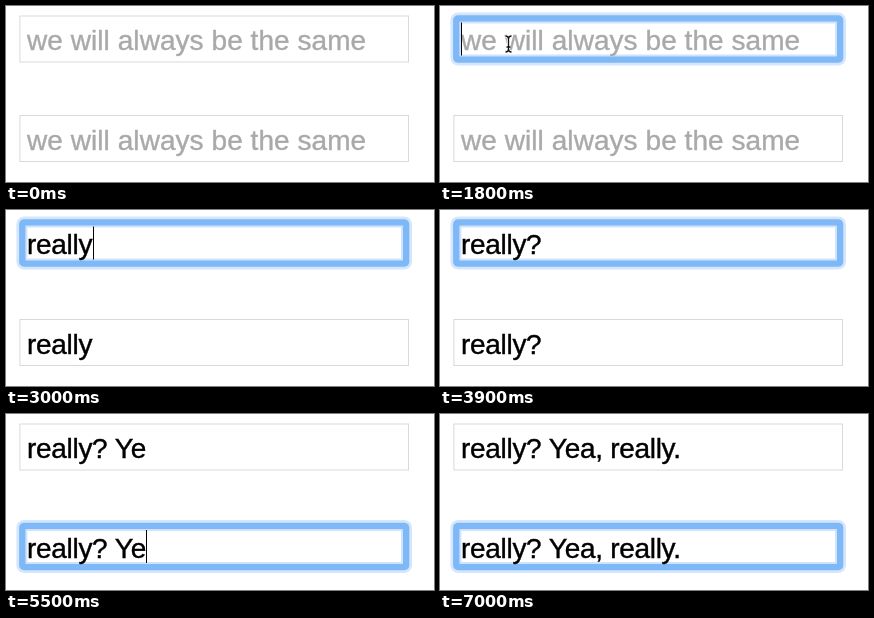
Recreate the animation shown at these times as an HTML page with a canvas. Size 428x176 px, loop 7400 ms.

```html
<!DOCTYPE html>
<html lang="en">
<head>
<meta charset="utf-8">
<title>Linked inputs</title>
<style>
html, body { margin: 0; width: 100%; height: 100%; overflow: hidden; background: #fff; }
canvas { display: block; width: 428px; height: 176px; }
</style>
</head>
<body>
<canvas id="stage" width="428" height="176"></canvas>
<script>
const ctx = document.getElementById('stage').getContext('2d');
const LOOP = 7400;
const HINT = 'we will always be the same';
const TEXT_X = 21;
const FIELD = { x: 13.4, y: 9.5, w: 389.6, h: 47, gap: 99.5 };

const FIRST = 0, SECOND = 1, NONE = -1;
const POINTER = { from: 1300, to: 2100 };
const SELECTED = { from: 4100, to: 4800 };

// [time, value, focused field, caret shown]
const steps = [
  [0, '', NONE, false],
  [1800, '', FIRST, true],
  [2100, 'r', FIRST, true],
  [2500, 're', FIRST, true],
  [2700, 'rea', FIRST, true],
  [2800, 'real', FIRST, true],
  [2900, 'reall', FIRST, true],
  [3000, 'really', FIRST, true],
  [3300, 'really?', FIRST, true],
  [3900, 'really?', FIRST, false],
  [4100, 'really?', SECOND, false],
  [4800, 'really? ', SECOND, true],
  [5300, 'really? ', SECOND, false],
  [5400, 'really? Y', SECOND, true],
  [5500, 'really? Ye', SECOND, true],
  [5600, 'really? Yea', SECOND, true],
  [5700, 'really? Yea,', SECOND, true],
  [5800, 'really? Yea, r', SECOND, true],
  [5900, 'really? Yea, re', SECOND, true],
  [6000, 'really? Yea, real', SECOND, true],
  [6100, 'really? Yea, reall', SECOND, true],
  [6300, 'really? Yea, really', SECOND, true],
  [6500, 'really? Yea, really.', SECOND, true],
  [7000, 'really? Yea, really.', SECOND, false]
];

const within = (t, span) => t >= span.from && t < span.to;

function rect(color, x, y, w, h, r = 0) {
  ctx.fillStyle = color;
  ctx.beginPath();
  ctx.roundRect(x, y, w, h, r);
  ctx.fill();
}

function drawFrame(y, focused) {
  const { x, w, h } = FIELD;
  const layer = (color, inset, r) =>
    rect(color, x + inset, y + inset, w - 2 * inset, h - 2 * inset, r);
  if (focused) {
    layer('#d3e6fc', -3, 8);
    layer('#7fb8f7', -0.3, 5);
    layer('#cfe4fc', 6, 1);
    layer('#fff', 8, 0);
  } else {
    layer('#d9d9d9', 0, 0);
    layer('#fff', 1, 0);
  }
}

function drawText(text, y, color) {
  ctx.fillStyle = ctx.strokeStyle = color;
  ctx.lineWidth = 0.4;
  ctx.fillText(text, TEXT_X, y);
  ctx.strokeText(text, TEXT_X, y);
}

function drawField(index, value, focused, caret, selected) {
  const y = FIELD.y + index * FIELD.gap;
  drawFrame(y, focused);

  ctx.font = '28px "Liberation Sans", Arial, sans-serif';
  ctx.letterSpacing = value ? '-0.3px' : '0.06px';
  const end = value ? Math.round(TEXT_X + 0.4 + ctx.measureText(value).width) : TEXT_X;

  if (focused && selected) rect('#b0d4fc', TEXT_X, y + 7, end - TEXT_X - 1, 33);
  drawText(value || HINT, y + 34.5, value ? '#000' : '#a9a9a9');
  if (focused && caret) rect('#000', end, y + 7, 1, 33);
}

function drawPointer(x, y) {
  ctx.beginPath();
  ctx.moveTo(x - 3, y - 8);
  ctx.quadraticCurveTo(x, y - 8, x, y - 5);
  ctx.lineTo(x, y + 5);
  ctx.quadraticCurveTo(x, y + 8, x - 3, y + 8);
  ctx.moveTo(x + 3, y - 8);
  ctx.quadraticCurveTo(x, y - 8, x, y - 5);
  ctx.moveTo(x, y + 5);
  ctx.quadraticCurveTo(x, y + 8, x + 3, y + 8);
  ctx.moveTo(x - 2, y + 3);
  ctx.lineTo(x + 2, y + 3);
  for (const [color, width] of [['#fff', 3], ['#111', 1.3]]) {
    ctx.strokeStyle = color;
    ctx.lineWidth = width;
    ctx.stroke();
  }
}

function draw(t) {
  const [, value, focus, caret] = steps.findLast(step => step[0] <= t);
  rect('#fff', 0, 0, 428, 176);
  for (const i of [FIRST, SECOND]) {
    drawField(i, value, focus === i, caret, within(t, SELECTED));
  }
  if (within(t, POINTER)) drawPointer(68.5, 38);
}

const start = performance.now();
function tick() {
  draw((performance.now() - start) % LOOP);
  requestAnimationFrame(tick);
}
tick();
</script>
</body>
</html>
```
